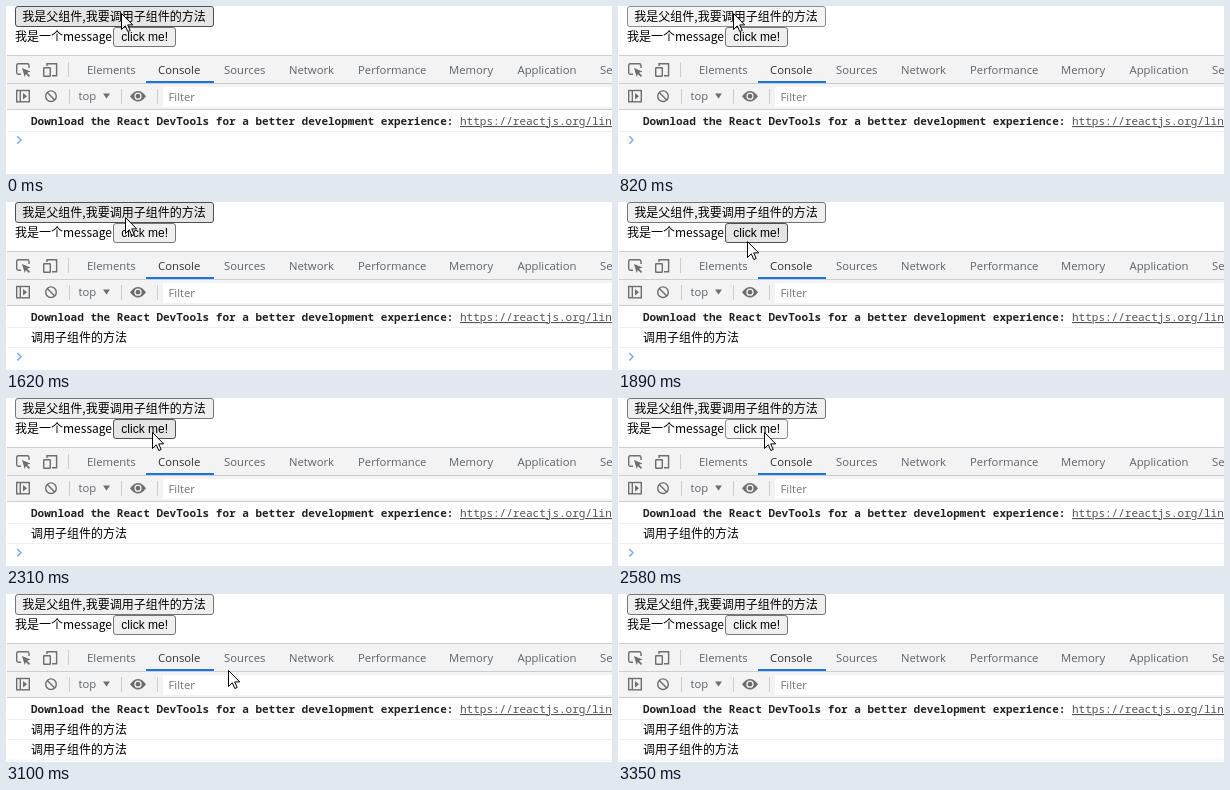
Animation, 606 px wide and 168 px high, one loop 3.92 s. Source, as an HTML page:

```html
<!DOCTYPE html>
<html lang="zh">
<head>
<meta charset="utf-8">
<title>Console demo</title>
<style>
  html, body { margin: 0; width: 100%; height: 100%; overflow: hidden; background: #fff; }
  svg { display: block; width: 606px; height: 168px; }
  text { white-space: pre; }
  .page { font: 12px "Noto Sans CJK SC", "Noto Sans CJK", sans-serif; fill: #000; }
  .click { font: 12px "Liberation Sans", Arial, sans-serif; fill: #000; }
  .ui { font: 11.3px "Open Sans", "Noto Sans", sans-serif; fill: #5f6368; }
  .mono { font: 11px "Noto Sans Mono", monospace; fill: #545454; }
  .bold { font-weight: 600; fill: #222; }
  .icon { fill: none; stroke: #6e6e6e; stroke-width: 1.4; }
  .solid { fill: #6e6e6e; }
  .line { fill: #cacdd1; }
  .row { fill: #f0f0f0; }
  .btn { fill: #efefef; stroke: #767676; }
  .btn.hover { fill: #e5e5e5; stroke: #4f4f4f; }
  .btn.active { fill: #f5f5f5; stroke: #8d8d8d; }
</style>
</head>
<body>
<svg viewBox="0 0 606 168">
  <rect id="callBtn" class="btn" x="9.5" y=".5" width="198" height="20" rx="2.5"/>
  <text class="page" x="16.3" y="15">我是父组件,我要调用子组件的方法</text>
  <text class="page" x="9" y="35">我是一个message</text>
  <rect id="clickBtn" class="btn" x="107.5" y="21.5" width="62" height="19" rx="2.5"/>
  <text class="click" x="115.3" y="35">click me!</text>

  <rect x="1" y="49" width="605" height="55" fill="#f3f3f3"/>
  <g class="line">
    <rect x="1" y="49" width="605" height="1"/>
    <rect x="1" y="77" width="605" height="1"/>
    <rect x="1" y="103" width="605" height="1"/>
    <rect x="62" y="56" width="1" height="15"/>
    <rect x="63" y="83" width="1" height="15"/>
    <rect x="115" y="83" width="1" height="15"/>
    <rect x="151" y="83" width="1" height="15"/>
  </g>
  <g id="tabs" class="ui"></g>
  <rect x="140" y="75" width="68" height="2" fill="#1a73e8"/>

  <g class="icon">
    <path d="M15 68.3h-2.6q-1.7 0-1.7-1.7v-7.2q0-1.7 1.7-1.7h8.9q1.7 0 1.7 1.7v2.6"/>
    <path d="M41 60v-2.3h9.6v12H46"/>
    <rect x="37.7" y="61.7" width="6.6" height="8.6" rx=".6"/>
    <rect x="10.7" y="84.5" width="12.6" height="11.3"/>
    <path d="M14.3 85v11"/>
    <circle cx="45" cy="90.2" r="5.3"/>
    <path d="M41.3 86.5l7.4 7.4"/>
  </g>
  <g class="solid">
    <path d="M16 62l8.5 3.4-3.4 1.3 3 3-1.2 1.2-3-3-1.2 3z"/>
    <path d="M17 87l4 3.3-4 3.3z"/>
    <path d="M97 87.5h7l-3.5 5z"/>
    <path d="M124 90.2q8-10.6 16 0q-8 10.6-16 0z"/>
    <circle cx="132" cy="90.2" r="3" stroke="#f3f3f3" stroke-width="1.3"/>
  </g>
  <text class="ui" x="72.5" y="94">top</text>
  <rect x="157" y="81" width="449" height="20" fill="#fff"/>
  <text class="ui" x="162.5" y="95" style="fill:#757575">Filter</text>

  <text class="mono bold" x="25" y="119">Download the React DevTools for a better development experience:</text>
  <text class="mono" x="454" y="119" text-decoration="underline">https://reactjs.org/link/react-devtools</text>
  <rect class="row" x="1" y="125" width="605" height="1"/>
  <g id="logs"></g>
  <path id="prompt" d="M11.3 130.3l3.7 3.7-3.7 3.7" fill="none" stroke="#7cacf8" stroke-width="1.5"/>

  <path id="cursor" d="M.5.5v16l3.8-3.7 2.5 5.7 2.4-1-2.5-5.6h5z" fill="#fff" stroke="#000" stroke-linejoin="round"/>
</svg>
<script>
const LOOP = 3920, ROW = 20.7;
const $ = id => document.getElementById(id);

$('tabs').innerHTML = [
  ['Elements', 81], ['Console', 152], ['Sources', 218], ['Network', 283],
  ['Performance', 352], ['Memory', 443], ['Application', 511.5], ['Security', 594]
].map(([name, x]) =>
  `<text x="${x}" y="68"${name === 'Console' ? ' style="fill:#333"' : ''}>${name}</text>`
).join('');

$('logs').innerHTML = [0, 1].map(i => `<g transform="translate(0 ${i * ROW})">
  <text class="page" x="25" y="139.7">调用子组件的方法</text>
  <rect class="row" x="1" y="145" width="605" height="1"/></g>`).join('');

// start ms, pointer x, pointer y, call button, click button, log rows
const steps = [
  [0, 115, 7, 'hover', '', 0],
  [820, 115, 7, 'active', '', 0],
  [1090, 115, 7, 'hover', '', 1],
  [1620, 119, 15, 'hover', '', 1],
  [1760, 124, 29, '', 'hover', 1],
  [1890, 129, 39, '', 'hover', 1],
  [2040, 136, 45, '', '', 1],
  [2160, 142, 43, '', '', 1],
  [2310, 146, 34, '', 'hover', 1],
  [2580, 146, 34, '', 'active', 1],
  [2700, 146, 34, '', 'hover', 2],
  [3100, 222, 76, '', '', 2],
  [3220, 384, 152, '', '', 2],
  [3350, 620, 180, '', '', 2]
];

function draw() {
  const t = performance.now() % LOOP;
  const [, x, y, call, click, rows] = steps.findLast(s => s[0] <= t);
  $('cursor').setAttribute('transform', `translate(${x} ${y})`);
  $('callBtn').setAttribute('class', 'btn ' + call);
  $('clickBtn').setAttribute('class', 'btn ' + click);
  [...$('logs').children].forEach((row, i) =>
    row.setAttribute('visibility', i < rows ? 'visible' : 'hidden'));
  $('prompt').setAttribute('transform', `translate(0 ${rows * ROW})`);
  requestAnimationFrame(draw);
}
draw();
</script>
</body>
</html>
```
